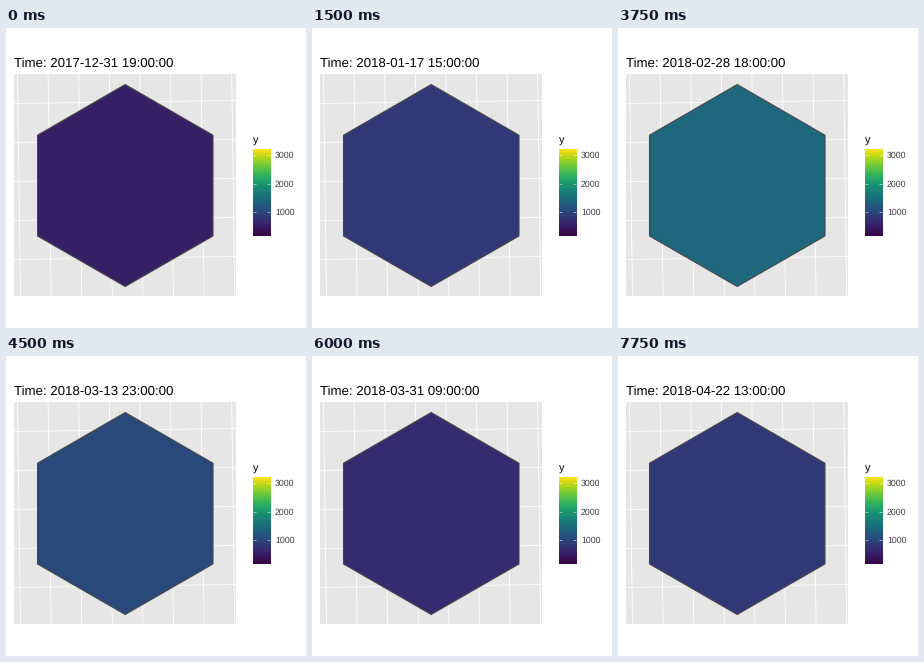
A matplotlib script that plays this animation: 300 px wide and 300 px high, repeating every 8 s.

```python
import numpy as np
import matplotlib.pyplot as plt
from matplotlib.animation import FuncAnimation
from matplotlib.patches import Polygon, Rectangle

SIZE, DPI = 300, 100
FRAMES, INTERVAL = 32, 250
PX = 72 / DPI  # points per pixel

plt.rcParams["font.family"] = "Liberation Sans"
plt.rcParams["text.hinting"] = "none"

# Key poses: frame, hours since the start, position on the colour scale
KEYS = np.array([
    (0, 0, 0.115), (6, 404, 0.22), (12, 876, 0.315), (15, 1415, 0.41),
    (20, 1943, 0.205), (26, 2253, 0.145), (30, 2598, 0.22), (31, 2682, 0.22),
])
START = np.datetime64("2017-12-31T19:00:00")


def display_gamma(rgb):
    """Convert sRGB values to a display with gamma 1.8."""
    rgb = np.asarray(rgb, float)
    linear = np.where(rgb <= 0.04045, rgb / 12.92, ((rgb + 0.055) / 1.055) ** 2.4)
    return linear ** (1 / 1.8)


def scale_color(t):
    rgba = np.asarray(plt.get_cmap("viridis")(t))
    return display_gamma(rgba[..., :3])


def grey(level):
    return tuple(display_gamma([level] * 3))


fig = plt.figure(figsize=(SIZE / DPI, SIZE / DPI), dpi=DPI, facecolor="white")
ax = fig.add_axes([0, 0, 1, 1])
ax.axis("off")

# Panel with a slightly tilted graticule
LEFT, TOP, SIDE, TILT = 8, 46, 222, 3
panel = Rectangle((LEFT, TOP), SIDE, SIDE, fc=grey(0.92), ec="none")
ax.add_patch(panel)


def grid_line(xs, ys):
    line, = ax.plot(xs, ys, color="white", lw=0.8 * PX)
    line.set_clip_path(panel)


for k in range(8):
    x = 11.5 + 30.6 * k
    grid_line([x, x + TILT], [TOP, TOP + SIDE])
for k in range(5):
    y = 75.5 + 39 * k
    grid_line([LEFT, LEFT + SIDE], [y, y - TILT])

hexagon = Polygon(
    [(119.2, 56.5), (207, 107.2), (207, 208), (119.2, 258.5), (31.5, 208), (31.5, 107.2)],
    ec=grey(0.35), lw=1.07 * PX, joinstyle="round", zorder=3)
ax.add_patch(hexagon)


def label(x, y, text, size, color="black"):
    return ax.text(x, y, text, fontsize=size * PX, color=color, va="baseline")


title = label(8, 39, "", 13.2)

# Colour bar
BAR_X, BAR_W, BAR_TOP, BAR_BOTTOM = 247, 17.3, 122, 208.5
ramp = scale_color(np.linspace(1, 0, 174))[:, None, :]
ax.imshow(ramp, extent=(BAR_X, BAR_X + BAR_W, BAR_BOTTOM, BAR_TOP),
          aspect="auto", interpolation="bilinear", zorder=2)
label(246.6, 116, "y", 11)
for value in (1000, 2000, 3000):
    y = 184 - 28.5 * (value - 1000) / 1000
    for x in (BAR_X, BAR_X + BAR_W * 0.8):
        ax.plot([x, x + BAR_W / 5], [y, y], color="white", lw=0.5 * PX,
                solid_capstyle="butt", zorder=4)
    label(269, y + 3.1, str(value), 8.8, grey(0.3))

ax.set_xlim(0, SIZE)
ax.set_ylim(SIZE, 0)


def update(frame):
    hours = round(np.interp(frame, KEYS[:, 0], KEYS[:, 1]))
    level = np.interp(frame, KEYS[:, 0], KEYS[:, 2])
    moment = START + np.timedelta64(int(hours), "h")
    title.set_text("Time: " + str(moment).replace("T", " "))
    hexagon.set_facecolor(tuple(scale_color(level)))
    return title, hexagon


anim = FuncAnimation(fig, update, frames=FRAMES, interval=INTERVAL,
                     repeat=True, repeat_delay=0)
plt.show()
```
